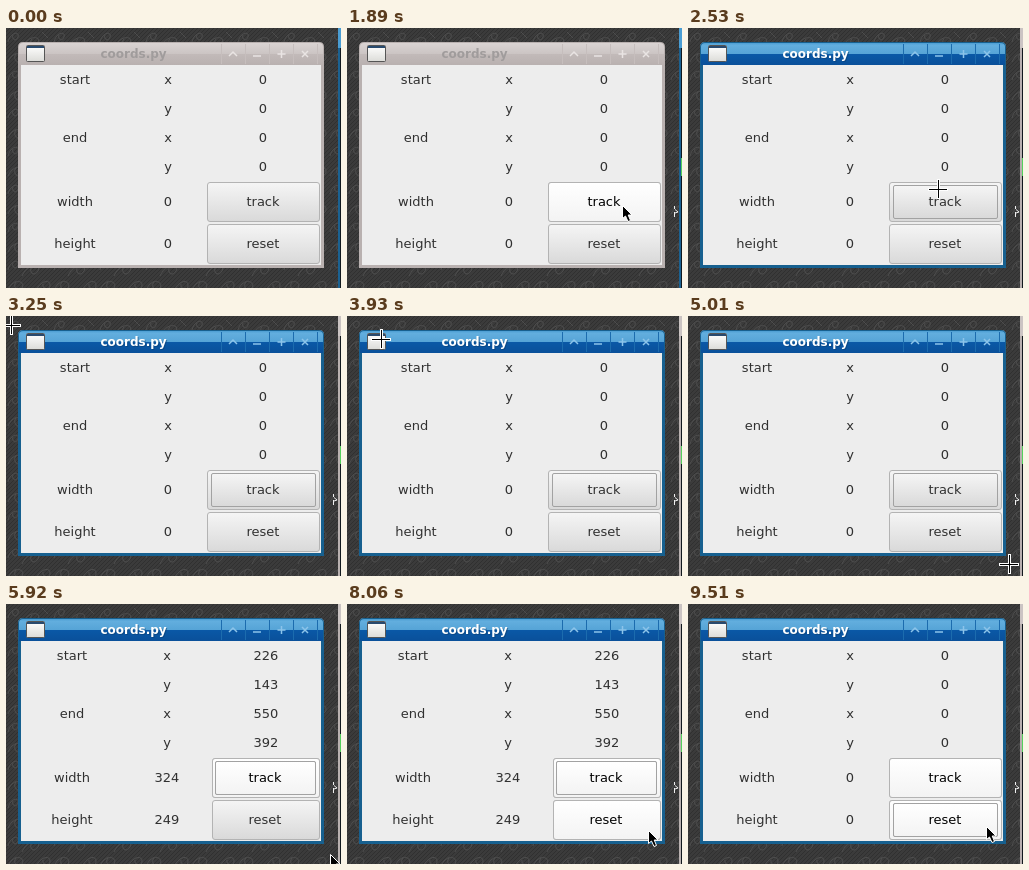
These frames come from a looping animation (335x260 px, 9.76 s). An HTML page:

```html
<!DOCTYPE html>
<html lang="en">
<head>
<meta charset="utf-8">
<title>coords.py</title>
<style>
@property --x { syntax: "<integer>"; inherits: true; initial-value: 326; }
@property --y { syntax: "<integer>"; inherits: true; initial-value: 178; }

html, body { margin: 0; width: 100%; height: 100%; overflow: hidden; background: #383838; }

.stage {
  --trail: 0; --prompt: 0; --active: 0; --wide: 0;
  --track-over: 0; --track-focus: 0; --reset-over: 0; --reset-focus: 0;
  --arrow: 0; --cross: 0;
  display: block; width: 335px; height: 260px;
  font: 13px "DejaVu Sans", sans-serif;
  text-anchor: middle;
  animation: state 9760ms step-end infinite, pointer 9760ms linear infinite;
}

/* interface states, all hard changes */
@keyframes state {
  0% {
    --trail: 0; --prompt: 0; --active: 0; --wide: 0;
    --track-over: 0; --track-focus: 0; --reset-over: 0; --reset-focus: 0;
    --arrow: 0; --cross: 0;
  }
  9.83% { --trail: 1; --arrow: 1; }
  10.24% { --track-over: 1; }
  19.36% { --prompt: 1; }
  19.87% { --active: 1; --track-over: 0; --track-focus: 1; }
  20.69% { --arrow: 0; --cross: 1; }
  55.32% { --cross: 0; }
  56.55% { --arrow: 1; }
  60.24% { --track-over: 1; }
  60.65% { --wide: 1; }
  80.94% { --reset-over: 1; }
  95.08% { --track-focus: 0; --reset-focus: 1; }
  95.59% { --wide: 0; }
}

@keyframes pointer {
  0%, 9.8% { --x: 326; --y: 178; animation-timing-function: ease-out; }
  12.29% { --x: 275; --y: 177; }
  24.2% { --x: 275; --y: 177; animation-timing-function: cubic-bezier(.4, 0, .4, 1); }
  33.29% { --x: 5; --y: 9; }
  34.22%, 34.6% { --x: 3; --y: 8; }
  36.26% { --x: 0; --y: 0; }
  38.5% { --x: 0; --y: 0; animation-timing-function: cubic-bezier(.45, 0, .6, .9); }
  45.18% { --x: 284; --y: 191; animation-timing-function: ease-out; }
  48.46%, 48.8% { --x: 313; --y: 241; animation-timing-function: ease-out; }
  53.68%, 55.32% { --x: 324; --y: 251; }
  56.5% { --x: 324; --y: 250; }
  79.2% { --x: 324; --y: 250; animation-timing-function: ease-in-out; }
  82.58%, 97% { --x: 301; --y: 226; }
  97.43%, 100% { --x: 298; --y: 222; }
}

.trail { opacity: var(--trail); }
.prompt { opacity: var(--prompt); }
.on { opacity: var(--active); }
.zero { opacity: calc(1 - var(--wide)); }
.result { opacity: var(--wide); }
.name { translate: calc(var(--wide) * -3px) 0; }
.axis { translate: calc(var(--wide) * -1px) 0; }
.labels { fill: #303030; }

.title { font-weight: bold; font-size: 12px; }
.glyphs { fill: none; stroke-width: 1.5; }

.track { --over: var(--track-over); --focus: var(--track-focus); }
.reset { --over: var(--reset-over); --focus: var(--reset-focus); }
.button rect {
  x: calc(201.5px + 5px * var(--wide));
  width: calc(112px - 5px * var(--wide));
  stroke: #b3b3b3;
}
.button .inner rect {
  x: calc(205.5px + 4px * var(--wide));
  width: calc(104px - 4px * var(--wide));
  stroke: #a2a2a2;
}
.inner { opacity: var(--focus); }
.lit { opacity: var(--over); }
.button text {
  fill: hsl(0 0% calc(19% - 19% * var(--over)));
  translate: calc(var(--wide) * 2px) 0;
}

.pointer { translate: calc(var(--x) * 1px) calc(var(--y) * 1px); }
.arrow { opacity: var(--arrow); }
.cross { opacity: var(--cross); }
</style>
</head>
<body>
<svg class="stage" viewBox="0 0 335 260">
  <defs>
    <linearGradient id="face" x2="0" y2="1">
      <stop stop-color="#f5f5f5"/><stop offset="1" stop-color="#d9d9d9"/>
    </linearGradient>
    <linearGradient id="bright" x2="0" y2="1">
      <stop stop-color="#fff"/><stop offset="1" stop-color="#f3f3f3"/>
    </linearGradient>
    <linearGradient id="idleBar" x2="0" y2="1">
      <stop stop-color="#dad4d3"/><stop offset=".5" stop-color="#cbc4c3"/>
      <stop offset=".5" stop-color="#c2bab9"/><stop offset="1" stop-color="#b9b1b0"/>
    </linearGradient>
    <linearGradient id="activeBar" x2="0" y2="1">
      <stop stop-color="#4c9dd2"/><stop offset=".1" stop-color="#62aede"/>
      <stop offset=".52" stop-color="#55a3d6"/><stop offset=".52" stop-color="#0a58a6"/>
      <stop offset="1" stop-color="#0a509a"/>
    </linearGradient>
    <linearGradient id="sheet" x2="0" y2="1">
      <stop stop-color="#fff"/><stop offset="1" stop-color="#dcdcd8"/>
    </linearGradient>
    <pattern id="hatch" width="4" height="4" patternUnits="userSpaceOnUse">
      <path d="M-1 1L1-1M0 4L4 0M3 5L5 3" stroke="#303030"/>
    </pattern>
    <pattern id="curls" width="46" height="38" patternUnits="userSpaceOnUse">
      <g fill="none" stroke="#505050" stroke-width=".9">
        <path d="M2 34C8 20 20 26 16 32S6 30 10 26M16 20C22 6 36 8 32 15S22 15 26 11"/>
        <path d="M30 36C32 26 44 22 44 29S36 33 37 28M2 14C4 4 14 3 12 9S5 10 7 7M36 4l6 6"/>
      </g>
    </pattern>
    <path id="controls" d="M223 28l4-4 4 4M247 28h8M271.500 26h8M275.500 22v8M296 23l6 6M302 23l-6 6"/>
    <path id="dividers" d="M215.500 16V36M239.500 16V36M263.500 16V36M287.500 16V36M311.500 16V36"/>
    <path id="frame" d="M12 240V19Q12 14 17 14H313Q318 14 318 19V240Z"/>
    <path id="bar" d="M13 37V19Q13 15 17 15H313Q317 15 317 19V37Z"/>
  </defs>

  <rect width="335" height="260" fill="#3b3b3b"/>
  <rect width="335" height="260" fill="url(#hatch)"/>
  <rect width="335" height="260" fill="url(#curls)"/>

  <!-- neighbouring window -->
  <path d="M334 0h1v260h-1z" fill="#12191e"/>
  <path d="M332 0h2v260h-2z" fill="#1b6292"/>
  <path d="M332 0h3v20h-3z" fill="#4a9dd3"/>
  <g class="on">
    <path d="M332 0h2v260h-2z" fill="#b9b1b0"/>
    <path d="M332 0h3v20h-3z" fill="#cbc4c3"/>
  </g>
  <path class="prompt" d="M334 130h1v18h-1z" fill="#55d05c"/>
  <path class="trail" d="M327.500 178v3M327.500 184v5M328 181.500l3 2.500-3 1" fill="none" stroke="#eee"/>

  <!-- window frame -->
  <use href="#frame" fill="#b9b1b0"/>
  <use href="#bar" fill="url(#idleBar)"/>
  <use href="#dividers" stroke="#c6bebd"/>
  <use class="glyphs" href="#controls" stroke="#e9e4e3"/>
  <text class="title" x="127.500" y="30" fill="#a09c9c">coords.py</text>
  <g class="on">
    <use href="#frame" fill="#17608f"/>
    <use href="#bar" fill="url(#activeBar)"/>
    <use href="#dividers" stroke="#1c6cae"/>
    <use class="glyphs" href="#controls" stroke="#8cc4ea"/>
    <text class="title" x="128.500" y="31" fill="#0b3c6c" opacity=".5">coords.py</text>
    <text class="title" x="127.500" y="30" fill="#fff">coords.py</text>
  </g>
  <rect x="20.500" y="17.500" width="18" height="16" rx="1" fill="url(#sheet)" stroke="#555"/>
  <path d="M21 18h17v2H21z" fill="#294a6e"/>
  <path d="M15 37H315V237H15z" fill="#ededed"/>

  <g class="labels">
    <g class="name">
      <text x="69" y="56">start</text>
      <text x="69" y="114">end</text>
      <text x="69" y="178">width</text>
      <text x="69" y="220">height</text>
    </g>
    <g class="axis">
      <text x="162" y="56">x</text>
      <text x="162" y="85">y</text>
      <text x="162" y="114">x</text>
      <text x="162" y="143">y</text>
    </g>
    <g class="zero">
      <text x="257" y="56">0</text>
      <text x="257" y="85">0</text>
      <text x="257" y="114">0</text>
      <text x="257" y="143">0</text>
      <text x="162" y="178">0</text>
      <text x="162" y="220">0</text>
    </g>
    <g class="result">
      <text x="260" y="56">226</text>
      <text x="260" y="85">143</text>
      <text x="260" y="114">550</text>
      <text x="260" y="143">392</text>
      <text x="161" y="178">324</text>
      <text x="161" y="220">249</text>
    </g>
  </g>

  <g class="button track">
    <rect y="154.500" height="39" rx="2.500" fill="url(#face)"/>
    <rect class="lit" y="154.500" height="39" rx="2.500" fill="url(#bright)"/>
    <g class="inner">
      <rect y="157.500" height="33" rx="1.500" fill="url(#face)"/>
      <rect class="lit" y="157.500" height="33" rx="1.500" fill="url(#bright)"/>
    </g>
    <text x="257" y="178">track</text>
  </g>
  <g class="button reset">
    <rect y="196.500" height="39" rx="2.500" fill="url(#face)"/>
    <rect class="lit" y="196.500" height="39" rx="2.500" fill="url(#bright)"/>
    <g class="inner">
      <rect y="199.500" height="33" rx="1.500" fill="url(#face)"/>
      <rect class="lit" y="199.500" height="33" rx="1.500" fill="url(#bright)"/>
    </g>
    <text x="257" y="220">reset</text>
  </g>

  <g class="pointer">
    <path class="arrow" d="M.5 .5V13.500L3.500 11L6 16.500L8.500 15.500L6.200 10H10Z" fill="#000" stroke="#fff"/>
    <g class="cross">
      <path d="M-10-1H10V2H-10ZM-1-10H2V10H-1Z" fill="#fff"/>
      <path d="M-9 0H9V1H-9ZM0-9H1V9H0Z" fill="#000"/>
    </g>
  </g>
</svg>
</body>
</html>
```
